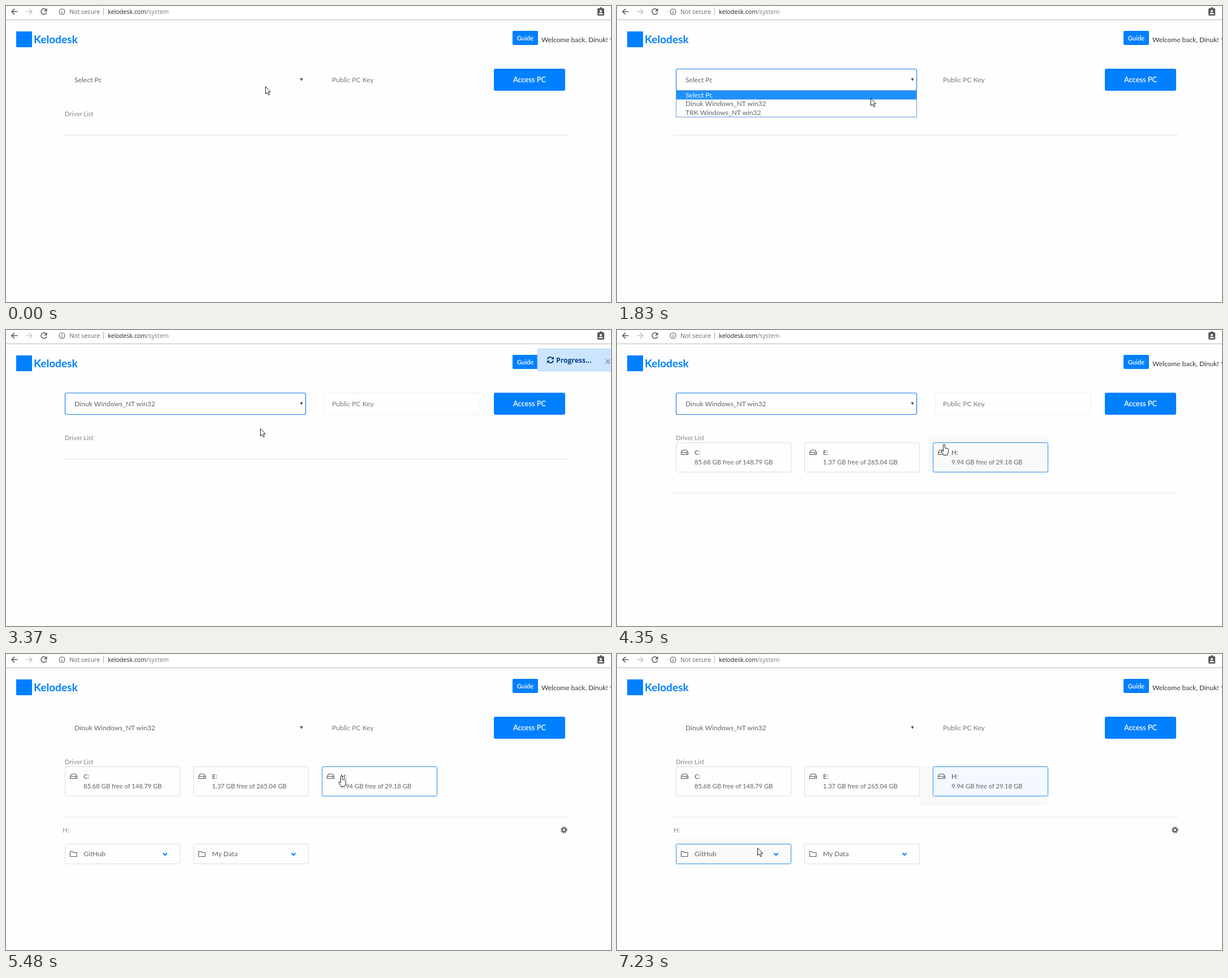
An HTML page for the animation above (8 s loop, 1069 px wide and 524 px high).

```html
<!DOCTYPE html>
<html lang="en">
<head>
<meta charset="utf-8">
<title>Remote drives</title>
<style>
  html, body { margin: 0; width: 100%; height: 100%; overflow: hidden; background: #fefefe; }
  svg { display: block; width: 100%; height: 100%; font: 12.1px Lato, sans-serif; }
  text { fill: #5f646a; white-space: pre; }
  .bar text { font: 10.7px "Open Sans", sans-serif; }
  .line { fill: none; stroke: #55595e; stroke-width: 1.6; }
  .thin { fill: none; stroke: #55595e; stroke-width: 1.1; }
  .label { font-size: 11px; font-weight: 600; fill: #999; }
  .button { font-weight: 600; fill: #fff; }
  .box { fill: #fefefe; stroke: #dcdcdc; }
  .focus { fill: none; stroke: #1a80e8; stroke-width: 1.2; }
  .small { font-size: 11.2px; }
  .pointer { fill: #fff; stroke: #222; stroke-width: 1; stroke-linejoin: round; }
</style>
</head>
<body>
<svg viewBox="0 0 1069 524" preserveAspectRatio="none">
  <rect width="1069" height="524" fill="#fefefe"/>

  <g class="bar">
    <rect width="1069" height="24" fill="#fff"/>
    <path d="M0 24.5H1069" stroke="#b9b9b9"/>
    <path class="line" d="M20.500 10H10M15 5 10 10 15 15"/>
    <path class="line" d="M35.500 10H46M41 5 46 10 41 15" style="stroke:#c3c3c3"/>
    <path class="line" d="M71 6.800A5 5 0 1 0 71.700 11.500"/>
    <path d="M72.500 4V9.500H67Z" fill="#55595e"/>
    <circle class="thin" cx="99" cy="10" r="5"/>
    <path class="thin" d="M99 9V13M99 7V8"/>
    <text x="112" y="14">Not secure</text>
    <path d="M172.500 3V16" stroke="#aaa"/>
    <text x="180" y="14" style="fill:#777"><tspan fill="#222">kelodesk.com</tspan>/system</text>
    <rect x="1045" y="4" width="12" height="13" rx="1.500" fill="#55595e"/>
    <circle cx="1051" cy="4" r="2" fill="#55595e"/>
    <circle cx="1051" cy="9" r="2" fill="#fff"/>
    <path d="M1047 14.500Q1047 12 1051 12T1055 14.500Z" fill="#fff"/>
  </g>

  <rect x="18" y="45" width="28" height="28" fill="#0080ff"/>
  <text x="49" y="65.500" style="font-size:19px;font-weight:700;fill:#0080ff">Kelodesk</text>
  <rect x="895" y="44" width="45" height="25" rx="2" fill="#0080ff"/>
  <text class="button" x="917.500" y="61" text-anchor="middle" style="font-size:11.2px">Guide</text>
  <text x="946" y="64" style="font-size:12px;fill:#333">Welcome back, Dinuk!</text>
  <path d="M1067 57.500H1073L1070 61Z" fill="#333"/>

  <rect id="selectFocus" class="focus" x="104.500" y="111.500" width="425" height="38" rx="3"/>
  <text id="selected" x="121" y="135"></text>
  <path d="M519.500 128H524.500L522 133Z" fill="#3c4a6b"/>
  <rect id="keyBorder" x="562.500" y="111.500" width="275" height="38" rx="3" fill="none" stroke="#eee"/>
  <text x="576" y="135" style="fill:#757a80">Public PC Key</text>
  <rect x="862" y="111" width="126" height="39" rx="3" fill="#0080ff"/>
  <text class="button" x="925" y="135" text-anchor="middle" style="font-size:12.8px">Access PC</text>

  <text class="label" x="104" y="195">Driver List</text>
  <path id="divider" d="M100 .5H992" stroke="#e3e3e3"/>
  <g id="drives"></g>
  <g id="folders">
    <text class="label" x="100" y="316">H:</text>
    <circle cx="986" cy="311.500" r="5" fill="none" stroke="#666b70" stroke-width="2" stroke-dasharray="2 1.927"/>
    <circle cx="986" cy="311.500" r="3.200" fill="none" stroke="#666b70" stroke-width="2.600"/>
  </g>
  <g id="menu">
    <rect x="104.500" y="149.500" width="425" height="47" fill="#fefefe" stroke="#6f98d8"/>
    <rect id="highlight" x="105" width="424" height="15.500" fill="#1e90ff"/>
  </g>

  <g id="toast">
    <rect x="939" y="33.500" width="140" height="39" rx="2" fill="#cce5ff" stroke="#b0d3f5"/>
    <g id="spinner" fill="none" stroke="#004085" stroke-width="1.900">
      <path d="M-5-1A5 5 0 0 1 4-3M5 1A5 5 0 0 1-4 3"/>
      <path d="M6-6V-1H1ZM-6 6V1H-1Z" fill="#004085" stroke="none"/>
    </g>
    <text x="972" y="58" style="font:700 12.2px 'Open Sans',sans-serif;fill:#004085">Progress...</text>
    <path d="M1059.500 52 1067 59.500M1067 52 1059.500 59.500" stroke="#7590ad" stroke-width="1.600"/>
  </g>

  <g id="cursor">
    <circle id="ring" cy="1" r="8" fill="none" stroke="#14335c" stroke-width="1.300"/>
    <path id="arrow" class="pointer" d="M.5.500V13.500L3.500 10.800 5.700 15.600 7.800 14.700 5.600 10H9.500Z"/>
    <path id="hand" class="pointer" d="M-1.500 10V1A1.500 1.500 0 0 1 1.500 1V6L6 7Q8 7.500 7.800 9.500L7 14 5.500 18.500H-1L-4.800 12Q-5.300 10 -3.500 10L-1.500 12Z"/>
  </g>
</svg>

<script>
const DURATION = 8000;
const $ = id => document.getElementById(id);
const add = (id, markup) => $(id).insertAdjacentHTML('beforeend', markup);
const show = (id, visible) => { $(id).style.display = visible ? '' : 'none'; };
const between = (t, start, end) => t >= start && t < end;

// Bursts of screen updates: first time, last time, number of updates.
const bursts = [
  [560, 560, 1], [990, 1140, 2], [1410, 2110, 6], [2390, 3370, 8],
  [3490, 3490, 1], [4080, 5050, 8], [5180, 5480, 3], [6200, 7230, 8]
];

// Cursor tip: time, x, y.
const path = [
  [0, 458, 142], [560, 458, 140], [1140, 458, 140], [1410, 455, 145],
  [1830, 448, 163], [2110, 448, 171], [2390, 449, 173], [3370, 449, 174],
  [3490, 449, 174], [4080, 470, 178], [4350, 578, 203], [4640, 591, 214],
  [5050, 593, 216], [5480, 593, 216], [6200, 591, 222], [6340, 572, 240],
  [6490, 510, 275], [6780, 350, 325], [7230, 248, 343]
];

const options = ['Select Pc', 'Dinuk Windows_NT win32', 'TRK Windows_NT win32'];
const drives = [
  ['C:', '85.68 GB free of 148.79 GB'],
  ['E:', '1.37 GB free of 265.04 GB'],
  ['H:', '9.94 GB free of 29.18 GB']
];
const folders = ['GitHub', 'My Data'];
const cardX = i => 104 + 227 * i;

options.forEach((name, i) =>
  add('menu', `<text id="option${i}" x="121" y="${162 + 15.4 * i}">${name}</text>`));

add('drives', '<rect id="shade" fill="#f9f9f9"/>');
drives.forEach(([name, space], i) => add('drives', `
  <g transform="translate(${cardX(i)} 199)">
    <rect id="drive${i}" class="box" x=".5" y=".5" width="203" height="52" rx="2"/>
    <path class="thin" d="M9.500 17.500 12 13.500H19L21.500 17.500V21.500H9.500ZM9.500 17.500H21.500M17 19.500H20"/>
    <text class="small" x="33" y="22" style="font-weight:600">${name}</text>
    <text class="small" x="33" y="39">${space}</text>
  </g>`));

add('folders', '<rect id="folderShade" x="104" y="325" width="204" height="46" fill="#fafafa"/>');
folders.forEach((name, i) => add('folders', `
  <g transform="translate(${cardX(i)} 336)">
    <rect id="folder${i}" class="box" x=".5" y=".5" width="203" height="35" rx="2"/>
    <path class="thin" d="M9.500 13.500H13.500L15 15.500H21V22.500H9.500Z"/>
    <text x="33" y="22">${name}</text>
    <path d="M173.500 16.500 177 20 180.500 16.500" fill="none" stroke="#0080ff" stroke-width="2"/>
  </g>`));

function heldTime(t) {
  const burst = bursts.filter(([start]) => start <= t).pop();
  if (!burst) return 0;
  const [start, end, count] = burst;
  if (t >= end) return end;
  const step = (end - start) / (count - 1);
  return start + Math.floor((t - start + 10) / step) * step;
}

function cursorAt(t) {
  const next = path.findIndex(([time]) => time > t);
  if (next < 0) return path[path.length - 1].slice(1);
  const [t0, x0, y0] = path[next - 1], [t1, x1, y1] = path[next];
  const k = (t - t0) / (t1 - t0);
  return [x0 + (x1 - x0) * k, y0 + (y1 - y0) * k];
}

function paintCard(id, active, fill) {
  $(id).style.stroke = active ? '#2a8ce8' : '';
  $(id).style.fill = fill || '';
}

function place(id, x, y, width, height) {
  Object.entries({ x, y, width, height }).forEach(([key, value]) => $(id).setAttribute(key, value));
}

function render(time) {
  const t = heldTime(time);
  const [x, y] = cursorAt(t).map(Math.round);
  const over = (i, top, bottom) => between(x, cardX(i), cardX(i) + 204) && between(y, top, bottom);
  const drivesReady = t >= 3490, foldersReady = t >= 5180;

  show('selectFocus', between(t, 990, 4770));
  $('selected').textContent = options[t < 2500 ? 0 : 1];
  show('keyBorder', between(t, 2660, 5180));

  show('menu', between(t, 1140, 2500));
  const active = y < 166 ? 0 : 1;
  $('highlight').setAttribute('y', 150 + 15.5 * active);
  options.forEach((_, i) => { $('option' + i).style.fill = i === active ? '#fff' : ''; });

  $('divider').setAttribute('transform', `translate(0 ${drivesReady ? 288.5 : 228})`);
  show('drives', drivesReady);
  show('folders', foldersReady);

  const overDrive = drives.map((_, i) => drivesReady && over(i, 199, 252));
  const left = t >= 6300 && !overDrive[2];
  const hovering = overDrive[2] && !foldersReady;
  drives.forEach((_, i) => {
    const selected = i === 2 && t >= 4770;
    const fill = i === 2 ? (left ? '#f3f9ff' : hovering && '#f9f9f9') : overDrive[i] && '#f9f9f9';
    paintCard('drive' + i, overDrive[i] || selected, fill);
  });
  show('shade', left || hovering);
  if (left) place('shade', 534, 199, 227, 70);
  else place('shade', 548, 190, 213, 61);

  folders.forEach((_, i) => {
    const hovered = foldersReady && over(i, 336, 371);
    paintCard('folder' + i, hovered, hovered && '#fafafa');
  });
  show('folderShade', over(0, 336, 371));

  show('toast', between(t, 2800, 3490) || between(t, 4770, 5180));
  $('spinner').setAttribute('transform', `translate(962 53) rotate(${(t - 3370) * 0.18})`);

  const pointing = overDrive.some(Boolean);
  show('hand', pointing);
  show('arrow', !pointing);
  show('ring', between(t, 990, 1140) || between(t, 2390, 2500) || between(t, 4770, 4900));
  $('cursor').setAttribute('transform', `translate(${x} ${y})`);
}

function tick() {
  render(performance.now() % DURATION);
  requestAnimationFrame(tick);
}
tick();
</script>
</body>
</html>
```
